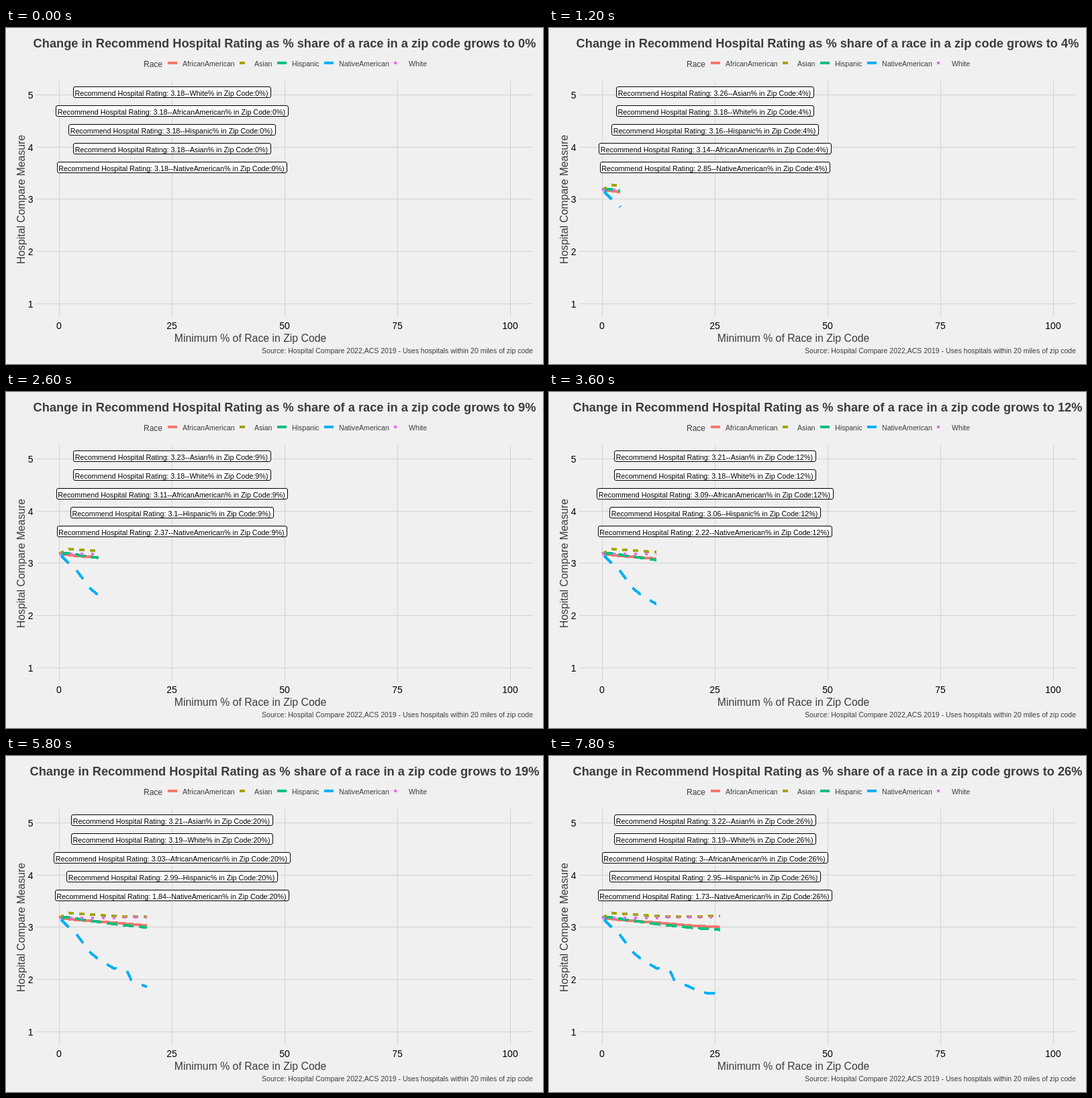
Write an HTML page that moves like this. It is 800 px wide and 500 px high and loops after 8 s.

```html
<!DOCTYPE html>
<html lang="en">
<head>
<meta charset="utf-8">
<title>Hospital rating by race share</title>
<style>
  html, body { margin: 0; width: 100%; height: 100%; overflow: hidden; background: #f0f0f0; }
  svg { display: block; width: 800px; height: 500px; }
  text { font-family: "Liberation Sans", Arial, sans-serif; fill: #3c3c3c; white-space: pre; }
  .title { font-size: 18.24px; font-weight: bold; }
  .legend { font-size: 10.6px; }
  .tick { font-size: 14px; fill: #000; }
  .axis { font-size: 15.8px; }
  .label { font-size: 10.75px; fill: #000; }
  .caption { font-size: 10.52px; }
  .box { fill: #fff; stroke: #000; }
  .grid { stroke: #d2d2d2; shape-rendering: crispEdges; }
  .line { fill: none; stroke-width: 4; shape-rendering: crispEdges; }
  .mid { text-anchor: middle; }
  .end { text-anchor: end; }
</style>
</head>
<body>
<svg id="stage" viewBox="0 0 800 500"></svg>
<script>
const stage = document.getElementById('stage');
const STEP = 200, STEPS = 40, SHARE_PER_STEP = 100 / 149;
const ROW = 28, LABEL_MID = 247.5, LABEL_PAD = 6;

function add(tag, attrs, content = '') {
  const node = document.createElementNS('http://www.w3.org/2000/svg', tag);
  for (const key in attrs) node.setAttribute(key, attrs[key]);
  node.textContent = content;
  return stage.appendChild(node);
}
const write = (x, y, cls, content, more) => add('text', { x, y, class: cls, ...more }, content);
const px = share => 79 + share * 6.727;
const py = rating => 99.5 + (5 - rating) * 77.7;

// points: the turns of each curve as [share, rating]
const series = [
  { name: 'AfricanAmerican', color: '#f8766d', dash: 'none',
    points: [[0, 3.18], [4, 3.14], [12, 3.09], [20, 3.03], [27, 3]] },
  { name: 'Asian', color: '#a3a500', dash: '8 8',
    points: [[0, 3.18], [2, 3.277], [12, 3.212], [20, 3.206], [27, 3.22]] },
  { name: 'Hispanic', color: '#00bf7d', dash: '16 8',
    points: [[0, 3.18], [2, 3.19], [9, 3.1], [12, 3.063], [20, 2.99], [27, 2.946]] },
  { name: 'NativeAmerican', color: '#00b0f6', dash: '16 16', shift: -4,
    points: [[0, 3.18], [4, 2.85], [7, 2.51], [9, 2.37], [12, 2.22], [15, 2.17],
             [16, 1.99], [20, 1.836], [22, 1.75], [27, 1.72]] },
  { name: 'White', color: '#e76bf3', dash: '4 12',
    points: [[0, 3.18], [27, 3.19]] }
];

function ratingAt({ points }, share) {
  const i = Math.max(1, points.findIndex(([s]) => s >= share));
  const [s0, r0] = points[i - 1], [s1, r1] = points[i];
  return r0 + (r1 - r0) * (share - s0) / (s1 - s0);
}

function pathTo(item, end) {
  const passed = item.points.filter(([s]) => s < end);
  return 'M' + [...passed, [end, ratingAt(item, end)]].map(([s, r]) => `${px(s)} ${py(r)}`).join('L');
}

// Grid, axes and captions
for (let i = 0; i < 5; i++) {
  const x = 79 + i * 168, y = Math.round(99 + i * 77.7);
  add('path', { class: 'grid', d: `M45 ${y + .5}H785M${x + .5} 79V430` });
  write(40.5, y + 6, 'tick end', 5 - i);
  write(x, 448, 'tick mid', i * 25);
}
const title = write(415, 29, 'title mid', '');
write(364, 467, 'axis mid', 'Minimum % of Race in Zip Code');
write(0, 0, 'axis mid', 'Hospital Compare Measure', { transform: 'translate(28 255) rotate(-90)' });
write(785, 484, 'caption end', 'Source: Hospital Compare 2022,ACS 2019 - Uses hospitals within 20 miles of zip code');

// Legend keys and curves
write(205, 58, '', 'Race', { 'font-size': 12 });
let keyX = 241;
for (const { name, color, dash } of series) {
  add('path', { class: 'line', d: `M${keyX} 52h14`, stroke: color, 'stroke-dasharray': dash });
  const width = write(keyX + 22, 57, 'legend', name).getComputedTextLength();
  keyX = Math.round(keyX + 22 + width + 7.5);
}
for (const item of series) {
  item.line = add('path', { class: 'line', stroke: item.color, 'stroke-dasharray': item.dash,
    'stroke-dashoffset': item.shift || 0 });
}

const rows = series.map((_, i) => ({
  box: add('rect', { class: 'box', y: 87.5 + i * ROW, height: 16, rx: 2.5 }),
  text: write(LABEL_MID - 1, 101 + i * ROW, 'label mid', '')
}));

// Equal ratings keep this order
const [african, asian, hispanic, native, white] = series;
const ranking = [white, african, hispanic, asian, native];

function draw(step) {
  const end = step * SHARE_PER_STEP;
  let share = 0;
  while (Math.round(share / SHARE_PER_STEP) < step) share++;

  title.textContent =
    `Change in Recommend Hospital Rating as % share of a race in a zip code grows to ${Math.round(end)}%`;
  for (const item of series) item.line.setAttribute('d', step ? pathTo(item, end) : '');

  ranking
    .map(item => ({ name: item.name, rating: Math.round(ratingAt(item, share) * 100) / 100 }))
    .sort((a, b) => b.rating - a.rating)
    .forEach(({ name, rating }, i) => {
      const { box, text } = rows[i];
      text.textContent = `Recommend Hospital Rating: ${rating}--${name}% in Zip Code:${share}%)`;
      const half = Math.round((text.getComputedTextLength() + LABEL_PAD) / 2);
      box.setAttribute('x', LABEL_MID - half);
      box.setAttribute('width', half * 2);
    });
}

const start = performance.now();
let shown = -1;
function tick() {
  const step = Math.floor((performance.now() - start) / STEP) % STEPS;
  if (step !== shown) draw(shown = step);
  requestAnimationFrame(tick);
}
tick();
</script>
</body>
</html>
```
